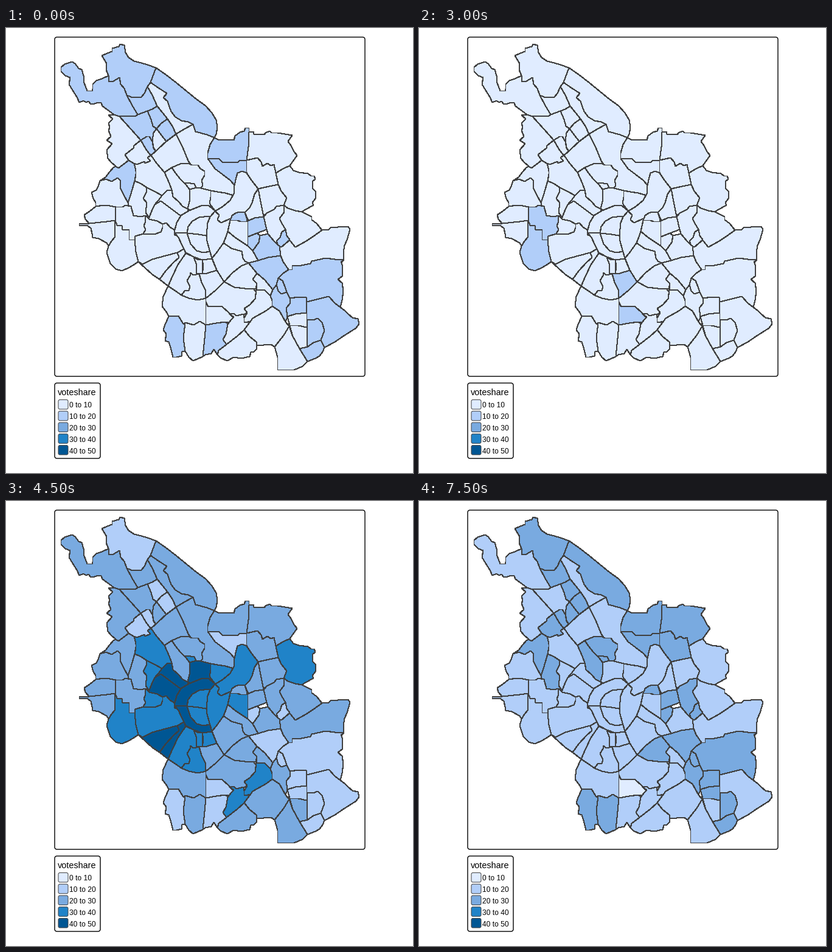
A matplotlib script that plays this animation: 669 px wide and 732 px high, repeating every 9000 ms.

```python
import matplotlib.pyplot as plt
from matplotlib.animation import FuncAnimation
from matplotlib.patches import FancyBboxPatch, Polygon

W, H, DPI = 669, 732, 64
PX = 72 / DPI  # one pixel in points
SHADES = ["#E0ECFF", "#B1CEF9", "#79AAE0", "#2083C8", "#005693"]
LABELS = ["0 to 10", "10 to 20", "20 to 30", "30 to 40", "40 to 50"]
BORDER = "#404040"

plt.rcParams["font.family"] = "Liberation Sans"
fig = plt.figure(figsize=(W / DPI, H / DPI), dpi=DPI, facecolor="white")
ax = fig.add_axes([0, 0, 1, 1])
ax.set_xlim(-0.5, W - 0.5)
ax.set_ylim(H - 0.5, -0.5)
ax.axis("off")

districts = []


def area(classes, *xy):
    """Add a district; classes holds one shade digit per map.

    Later districts cover the loose inner edges of earlier ones."""
    patch = Polygon(list(zip(xy[::2], xy[1::2])), closed=True, ec=BORDER,
                    lw=PX, aa=False, joinstyle="round",
                    zorder=1 + len(districts) / 1000)
    ax.add_patch(patch)
    districts.append((patch, classes))


def box(x, y, w, h, r, fc, ec, lw):
    ax.add_patch(FancyBboxPatch((x, y), w, h, fc=fc, ec=ec, lw=lw * PX,
                                boxstyle=f"round,pad=0,rounding_size={r}"))


# north
area("120201", 168, 78, 157, 83, 148, 86, 142, 92, 142, 100, 141, 103, 133, 103,
     130, 95, 128, 90, 127, 78, 124, 68, 119, 66, 113, 58, 108, 55, 96, 59,
     90, 64, 90, 71, 97, 78, 105, 81, 103, 92, 109, 102, 116, 113, 120, 122,
     127, 119, 131, 122, 135, 120, 139, 125, 145, 124, 151, 122, 156, 123,
     158, 128, 165, 133, 177, 142, 186, 145, 213, 147, 225, 140, 215, 118,
     205, 105, 180, 75)
area("120202", 246, 65, 262, 76, 280, 90, 297, 104, 313, 117, 327, 127, 338, 139,
     345, 151, 347, 163, 345, 174, 342, 180, 325, 185, 300, 170, 265, 140,
     250, 120, 235, 92)
area("020201", 237, 89, 250, 98, 264, 107, 258, 114, 265, 120, 268, 129, 271, 137,
     278, 146, 288, 152, 299, 154, 307, 158, 300, 172, 280, 182, 265, 165,
     255, 145, 238, 120, 228, 95)
area("120201", 181, 144, 186, 145, 213, 144, 216, 142, 232, 136, 245, 150,
     250, 170, 248, 180, 235, 190, 222, 190, 200, 175, 182, 152)
area("110202", 198, 110, 205, 113, 214, 114, 222, 113, 232, 96, 240, 110,
     248, 128, 238, 134, 232, 136, 216, 142, 207, 127)
area("120102", 168, 78, 164, 68, 165, 58, 157, 45, 166, 41, 174, 38, 174, 33,
     185, 30, 187, 26, 194, 28, 196, 40, 201, 48, 210, 54, 222, 57, 232, 60,
     246, 65, 243, 73, 237, 89, 232, 96, 227, 107, 222, 113, 214, 114, 205, 113,
     198, 110, 194, 99, 188, 92, 186, 81, 176, 87, 169, 88)
area("110112", 232, 136, 240, 133, 248, 128, 257, 139, 265, 149, 255, 156,
     247, 165, 241, 161, 238, 150)
area("120102", 247, 165, 255, 156, 265, 149, 273, 161, 279, 174, 263, 186, 255, 176)
area("020202", 247, 165, 255, 176, 263, 186, 253, 195, 246, 203, 242, 196,
     240, 184, 242, 172)
area("120102", 221, 184, 231, 178, 235, 178, 240, 186, 242, 197, 246, 203,
     237, 209, 229, 198)

# west
area("030201", 177, 142, 168, 143, 175, 149, 168, 156, 170, 163, 168, 168, 172, 178,
     165, 184, 174, 190, 165, 200, 167, 214, 172, 220, 180, 227, 184, 230,
     205, 225, 215, 205, 222, 195, 221, 184, 205, 166, 195, 155, 186, 145)
area("120202", 184, 230, 180, 227, 176, 229, 170, 236, 163, 245, 154, 251,
     165, 262, 185, 275, 200, 290, 212, 275, 222, 240, 215, 215, 201, 217, 195, 222)
area("030201", 154, 251, 151, 260, 148, 266, 140, 270, 143, 280, 147, 287, 147, 293,
     160, 300, 185, 300, 205, 298, 200, 287, 193, 274, 188, 264, 187, 250,
     183, 246, 173, 252, 164, 248)
area("030201", 147, 293, 137, 301, 128, 307, 130, 314, 136, 321, 165, 325, 185, 320,
     188, 300, 180, 294, 170, 292, 160, 291)
area("020201", 136, 321, 120, 322, 120, 324, 134, 325, 139, 329, 141, 338, 142, 344,
     152, 346, 165, 353, 168, 358, 185, 350, 185, 318, 179, 316, 165, 318)
area("031301", 168, 358, 165, 369, 171, 387, 180, 396, 190, 399, 203, 393, 211, 388,
     217, 384, 225, 375, 220, 345, 205, 325, 190, 315, 179, 316, 178, 344, 173, 350)
area("010301", 210, 221, 222, 210, 238, 209, 250, 215, 275, 255, 270, 275, 245, 280,
     235, 275, 215, 265, 211, 251, 213, 240, 213, 235)
area("030102", 195, 208, 209, 197, 210, 193, 221, 184, 229, 198, 237, 209,
     232, 213, 237, 218, 228, 222, 227, 219, 215, 224, 209, 222, 201, 217)
area("020202", 211, 251, 222, 256, 231, 262, 238, 275, 235, 300, 232, 309, 215, 318,
     203, 300, 200, 287, 204, 275, 207, 265)
area("031201", 180, 294, 191, 294, 196, 291, 205, 293, 209, 308, 221, 310, 229, 308,
     236, 318, 235, 330, 225, 338, 212, 342, 211, 348, 202, 348, 202, 332,
     191, 331, 190, 325, 182, 324, 179, 316)
area("010301", 231, 262, 230, 270, 225, 280, 231, 287, 229, 303, 233, 309, 250, 310,
     265, 280, 256, 275, 243, 268)

# left bank, north of the centre
area("020201", 238, 209, 262, 187, 279, 174, 300, 190, 305, 225, 285, 235, 270, 245,
     260, 237, 247, 222)
area("010201", 279, 174, 292, 166, 307, 158, 311, 170, 330, 175, 342, 180, 345, 200,
     345, 220, 365, 235, 385, 260, 380, 280, 355, 285, 325, 275, 310, 250,
     310, 235, 299, 218, 290, 196)
area("010202", 272, 229, 286, 223, 299, 222, 305, 225, 315, 225, 319, 231, 326, 235,
     326, 242, 321, 250, 323, 258, 320, 263, 315, 272, 305, 260, 285, 255, 275, 240)
area("010202", 260, 237, 272, 229, 278, 238, 286, 248, 293, 255, 302, 262, 302, 270,
     301, 285, 298, 297, 285, 300, 270, 285, 272, 266, 268, 255)
area("010302", 293, 254, 303, 255, 309, 256, 312, 262, 302, 266, 298, 261)
area("010401", 302, 265, 312, 262, 320, 263, 336, 267, 345, 280, 343, 299, 330, 305,
     310, 305, 298, 297, 301, 285)
area("010301", 336, 267, 347, 269, 360, 271, 374, 275, 375, 285, 350, 305, 343, 300,
     334, 288, 336, 278)
area("010401", 256, 275, 264, 267, 272, 266, 274, 277, 283, 285, 290, 293, 298, 297,
     300, 305, 288, 309, 262, 300, 252, 288, 244, 290, 250, 283)
area("000401", 244, 290, 254, 284, 262, 290, 270, 296, 286, 308, 290, 320, 285, 335,
     265, 335, 240, 325, 234, 313, 240, 298)
area("020301", 229, 308, 235, 314, 248, 317, 257, 322, 257, 330, 254, 335, 245, 345,
     230, 345, 225, 338, 229, 331, 226, 325, 228, 320)
area("020301", 211, 348, 212, 342, 225, 338, 243, 339, 254, 335, 257, 328, 257, 322,
     263, 320, 269, 327, 277, 332, 290, 345, 292, 363, 285, 375, 240, 390,
     224, 388, 217, 384, 213, 368)

# left bank, south of the centre
area("020201", 266, 424, 258, 441, 256, 457, 264, 468, 267, 474, 280, 490, 300, 500,
     335, 500, 335, 470, 340, 440, 315, 435, 285, 430)
area("010401", 217, 384, 224, 388, 240, 380, 262, 374, 281, 369, 292, 363, 290, 380,
     265, 415, 252, 413, 240, 405)
area("010401", 252, 413, 262, 399, 275, 385, 284, 377, 281, 369, 292, 363, 295, 370,
     295, 390, 280, 430, 266, 424)
area("010301", 266, 424, 273, 408, 282, 389, 295, 370, 308, 376, 318, 385, 315, 410,
     305, 430, 288, 439, 278, 432)
area("010301", 308, 376, 314, 380, 322, 381, 322, 403, 312, 404, 313, 390)
area("010301", 322, 381, 338, 379, 346, 398, 330, 403, 322, 404, 324, 392)
area("020301", 297, 415, 302, 407, 303, 402, 307, 406, 317, 404, 330, 415, 328, 444,
     315, 447, 300, 444, 288, 439, 293, 432, 300, 431, 302, 425)
area("031201", 317, 404, 330, 403, 346, 398, 360, 405, 358, 417, 344, 431, 328, 444,
     327, 430, 321, 418)
area("010401", 276, 335, 280, 320, 287, 308, 300, 300, 320, 292, 332, 291, 343, 300,
     345, 315, 335, 320, 310, 325, 300, 345, 277, 340)
area("010401", 276, 336, 297, 337, 315, 350, 335, 360, 345, 370, 338, 379, 322, 381,
     308, 376, 295, 369, 288, 355, 283, 344)
area("010301", 297, 337, 299, 326, 306, 317, 317, 311, 334, 309, 345, 330, 340, 345,
     328, 341, 316, 339)
area("010301", 297, 337, 316, 339, 328, 341, 345, 350, 345, 365, 335, 367, 324, 369,
     313, 366, 303, 355)
area("030201", 328, 444, 344, 431, 358, 417, 375, 415, 400, 420, 415, 440, 400, 465,
     385, 475, 350, 470, 335, 465, 328, 450)
area("120102", 267, 474, 283, 473, 290, 485, 305, 495, 305, 530, 294, 531, 289, 532,
     288, 539, 280, 541, 274, 541, 270, 525, 267, 516, 261, 514, 263, 503,
     258, 496, 261, 487)
area("020202", 294, 484, 308, 488, 318, 482, 328, 488, 340, 500, 330, 525, 323, 540,
     307, 547, 300, 541, 294, 531, 291, 510)
area("120101", 328, 488, 345, 485, 360, 483, 370, 490, 365, 515, 362, 520, 349, 530,
     347, 537, 341, 528, 337, 535, 327, 537, 323, 540, 326, 510)
area("020201", 347, 537, 349, 530, 362, 520, 370, 500, 400, 495, 420, 510, 412, 522,
     411, 528, 407, 532, 402, 533, 400, 540, 386, 543, 374, 541, 363, 547, 352, 542)
area("041100", 328, 450, 331, 457, 355, 458, 366, 468, 375, 478, 369, 484, 360, 483,
     345, 485, 328, 488)
area("020301", 366, 469, 375, 470, 378, 473, 390, 470, 391, 476, 405, 490, 390, 497,
     380, 506, 362, 520, 356, 512, 361, 503, 364, 487, 369, 480, 374, 475)
area("020301", 411, 430, 420, 425, 445, 445, 440, 462, 415, 480, 391, 484, 391, 476,
     396, 468, 391, 461, 400, 455, 409, 445)

# right bank, north
area("120202", 342, 180, 350, 184, 358, 183, 374, 184, 376, 177, 384, 171, 391, 169,
     393, 164, 399, 164, 399, 171, 410, 180, 410, 210, 385, 228, 345, 222,
     331, 214, 331, 205, 335, 191)
area("020202", 399, 171, 406, 170, 407, 174, 424, 175, 426, 172, 433, 169, 436, 172,
     446, 172, 470, 176, 463, 186, 468, 193, 473, 203, 478, 209, 466, 226,
     455, 240, 430, 235, 405, 225, 395, 217, 398, 195)
area("020301", 443, 238, 455, 231, 466, 226, 472, 234, 481, 237, 496, 239, 501, 243,
     506, 243, 508, 248, 503, 252, 504, 264, 509, 269, 508, 280, 503, 287,
     505, 291, 490, 299, 486, 302, 470, 310, 450, 285, 435, 250)
area("120102", 331, 214, 350, 215, 355, 220, 380, 221, 383, 218, 395, 217, 405, 230,
     400, 250, 385, 260, 375, 258, 368, 250, 355, 240, 343, 231)
area("020202", 395, 217, 413, 213, 419, 220, 421, 227, 429, 222, 435, 226, 440, 224,
     443, 238, 447, 257, 440, 268, 418, 272, 400, 255, 395, 237)
area("010311", 375, 258, 378, 245, 380, 238, 388, 235, 395, 238, 403, 250, 414, 264,
     412, 290, 400, 308, 385, 310, 360, 318, 353, 320, 347, 315, 350, 307,
     343, 301, 356, 293, 368, 283, 374, 272)
area("010201", 414, 264, 432, 260, 447, 257, 452, 268, 461, 279, 456, 291, 445, 305,
     430, 312, 415, 300, 412, 280)
area("010201", 414, 264, 418, 285, 423, 310, 415, 318, 400, 320, 396, 312, 392, 303,
     400, 295, 404, 287, 408, 273)
area("110202", 371, 308, 377, 304, 383, 302, 392, 303, 395, 312, 396, 318, 385, 325,
     368, 316)
area("010301", 343, 301, 350, 307, 347, 315, 353, 320, 368, 313, 369, 320, 375, 335,
     370, 350, 360, 365, 345, 385, 338, 378, 334, 365, 330, 350, 329, 340,
     331, 320, 335, 310)
area("000311", 368, 316, 380, 316, 385, 318, 397, 318, 398, 330, 397, 358, 385, 358,
     364, 334, 366, 325)
area("020201", 338, 378, 345, 370, 357, 353, 370, 355, 395, 370, 400, 383, 398, 386,
     386, 391, 372, 402, 358, 417, 346, 398)
area("010211", 364, 334, 376, 344, 397, 358, 405, 366, 414, 379, 414, 382, 398, 386,
     392, 383, 389, 378, 387, 367, 370, 362, 357, 353, 361, 343)
area("110202", 397, 317, 408, 312, 423, 310, 428, 331, 412, 337, 397, 343)
area("110102", 397, 343, 412, 337, 417, 341, 415, 352, 405, 366, 397, 358)

# right bank, east and south
area("030201", 519, 332, 530, 331, 533, 328, 545, 327, 562, 326, 565, 331, 560, 348,
     556, 357, 554, 369, 555, 381, 540, 395, 480, 405, 466, 400, 452, 381,
     449, 360, 465, 345, 480, 345, 505, 330)
area("020201", 456, 291, 463, 296, 475, 300, 486, 302, 502, 310, 502, 315, 510, 321,
     519, 332, 505, 342, 493, 350, 475, 360, 467, 350, 458, 345, 445, 325, 449, 300)
area("020202", 423, 310, 428, 304, 440, 298, 444, 293, 456, 291, 457, 302, 449, 313,
     453, 321, 459, 331, 452, 337, 447, 357, 440, 350, 430, 338, 428, 331)
area("120201", 417, 341, 430, 338, 440, 350, 449, 358, 451, 374, 430, 377, 414, 382,
     405, 366, 415, 352)
area("120102", 459, 331, 461, 341, 466, 348, 452, 360, 447, 357, 444, 350, 450, 344,
     453, 335)
area("120102", 464, 397, 470, 397, 470, 391, 485, 390, 500, 387, 502, 383, 525, 378,
     540, 380, 555, 381, 550, 384, 553, 391, 552, 408, 545, 413, 552, 419,
     554, 432, 552, 447, 549, 459, 540, 470, 510, 460, 480, 455, 455, 440,
     452, 425, 445, 400)
area("110102", 398, 386, 414, 382, 430, 377, 451, 374, 455, 384, 464, 397, 455, 403,
     447, 411, 444, 422, 442, 435, 425, 425, 412, 403)
area("020202", 358, 417, 372, 402, 386, 391, 398, 386, 412, 403, 405, 413, 412, 420,
     410, 429, 392, 428, 375, 426)
area("020201", 412, 403, 425, 414, 438, 430, 445, 440, 434, 440, 425, 431, 411, 430,
     412, 420, 405, 413)
area("120202", 438, 430, 444, 422, 447, 432, 452, 437, 461, 434, 466, 444, 467, 452,
     472, 465, 462, 475, 459, 483, 449, 465, 437, 457, 437, 448, 434, 440)
area("120102", 447, 411, 454, 415, 458, 425, 461, 434, 452, 437, 447, 432, 444, 422)
area("120102", 467, 444, 480, 442, 493, 443, 494, 468, 485, 478, 462, 474, 460, 460,
     467, 452)
area("020102", 462, 474, 475, 470, 494, 468, 494, 492, 480, 498, 466, 489, 464, 482)
area("020201", 466, 489, 480, 489, 494, 492, 495, 524, 482, 527, 472, 512)
area("030201", 465, 490, 470, 505, 482, 527, 495, 548, 487, 556, 473, 562, 446, 562,
     446, 541, 441, 524, 456, 505)
area("020201", 405, 477, 428, 464, 437, 457, 449, 465, 459, 483, 465, 490, 456, 505,
     441, 524, 435, 520, 412, 522, 411, 516, 400, 507, 391, 496, 402, 481)
area("120101", 494, 450, 510, 446, 530, 441, 540, 452, 549, 459, 556, 464, 562, 470,
     569, 476, 578, 478, 580, 486, 575, 493, 553, 507, 540, 516, 523, 525,
     515, 522, 505, 500, 494, 479)
area("120102", 494, 479, 504, 480, 512, 477, 519, 484, 523, 497, 517, 513, 505, 517,
     495, 524)
area("120102", 482, 527, 495, 524, 505, 517, 517, 513, 523, 525, 520, 532, 515, 539,
     508, 543, 495, 548)

# frame and legend
box(79.5, 14.5, 510, 558, 4, "none", "black", 1.4)
box(79.5, 583.5, 75, 124, 4, "white", "black", 1.4)
ax.text(84.5, 603, "voteshare", size=14.4 * PX)
for i, (shade, label) in enumerate(zip(SHADES, LABELS)):
    y = 611 + 18.75 * i
    box(85.5, y, 16, 15.5, 2.5, shade, BORDER, 1)
    ax.text(104, y + 13, label, size=12 * PX)


def draw(i):
    for patch, classes in districts:
        patch.set_facecolor(SHADES[int(classes[i])])
    return [patch for patch, _ in districts]


anim = FuncAnimation(fig, draw, frames=6, interval=1500, repeat=True,
                     repeat_delay=0, init_func=lambda: draw(0))
plt.show()
```
